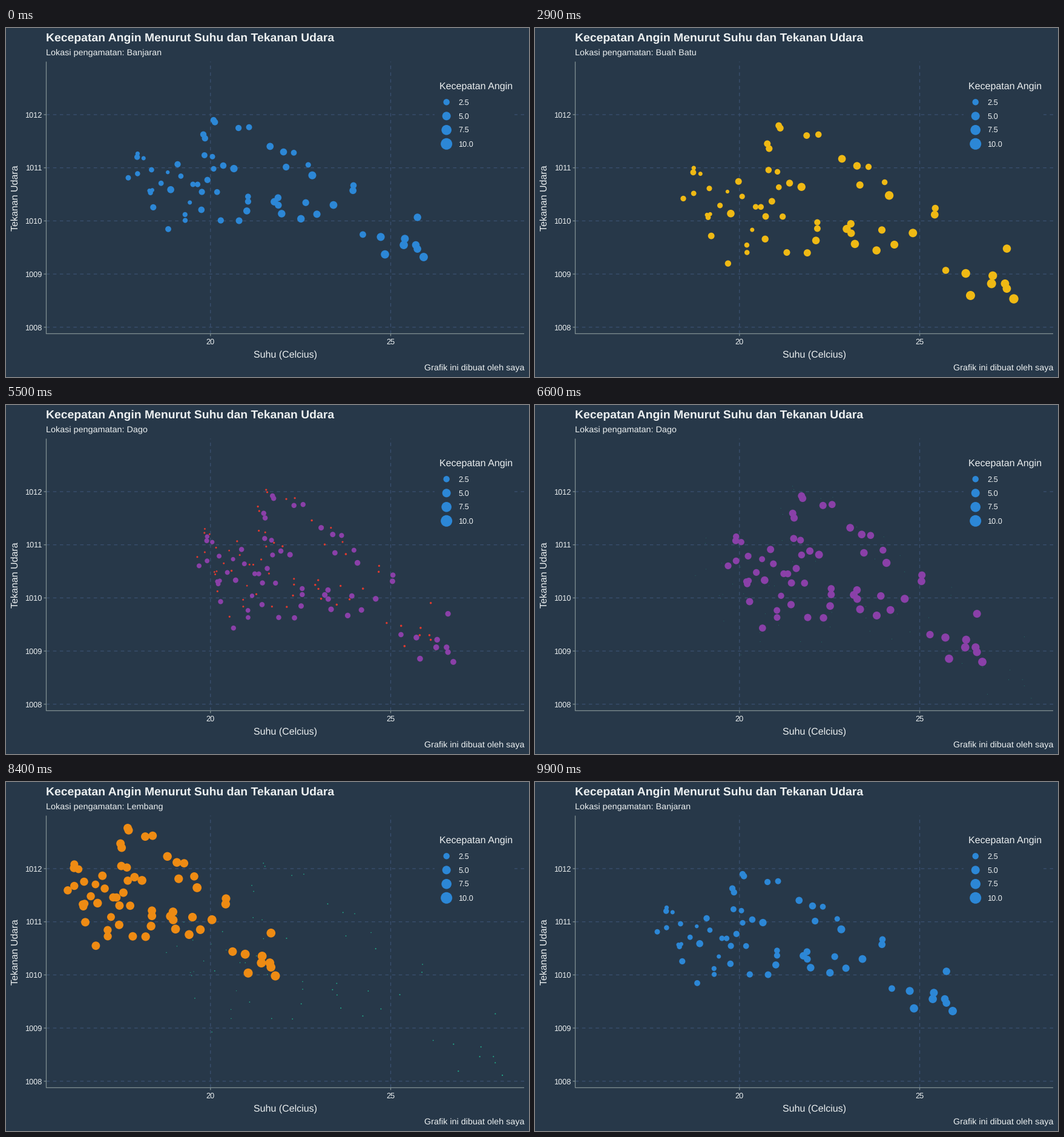
A matplotlib script that plays this animation: 864 px wide and 576 px high, repeating every 10000 ms.

```python
import numpy as np
import matplotlib.pyplot as plt
from matplotlib.animation import FuncAnimation
from matplotlib.patches import Rectangle

W, H, DPI = 864, 576, 100
PT = 72 / DPI
BG, INK, GRID, AXIS = "#273849", "#ecf0f1", "#3a5070", "#7f8f92"
BLUE = "#2c87d6"
FRAMES, MOVE = 100, 7

plt.rcParams["font.family"] = "Liberation Sans"
plt.rcParams["text.hinting"] = "none"
plt.rcParams["lines.scale_dashes"] = False

# One day of weather: (temperature, falling pressure), night to evening.
DAY = np.array([
    (.14, .36), (.22, .43), (.22, .53), (.25, .70), (.37, .58), (.48, .46),
    (.38, .33), (.36, .10), (.50, .13), (.65, .33), (.80, .50), (.98, .83),
    (.92, .97), (.72, .68), (.54, .60), (.42, .58), (.27, .34)])
HOURS = 66

# Name, colour, left, right, top, bottom, smallest and largest usual radius.
STATIONS = [
    ("Banjaran", BLUE, 202, 690, 152, 378, 3.5, 6.4),
    ("Braga", "#2fc75e", 260, 766, 153, 439, 3.8, 7.0),
    ("Buah Batu", "#efb914", 245, 791, 161, 447, 3.5, 7.0),
    ("Cibiru", "#e23a2e", 316, 710, 140, 403, 3.8, 4.9),
    ("Dago", "#8a40a8", 319, 739, 150, 424, 5.2, 6.7),
    ("Lanud", "#21b08c", 265, 820, 134, 484, 3.2, 7.8),
    ("Lembang", "#ee8b13", 102, 445, 76, 320, 7.1, 8.1),
]


def weather():
    """Three noisy days scaled to the unit square, with wind strength."""
    rng = np.random.default_rng(12)
    n = len(DAY)
    hour = np.linspace(0, 3 * n, HOURS, endpoint=False)
    path = np.column_stack([np.interp(hour, np.arange(n), c, period=n)
                            for c in DAY.T])
    path += rng.normal(0, (.045, .06), path.shape)
    path -= path.min(axis=0)
    path /= path.max(axis=0)
    wind = np.sqrt(path[:, 0]) + rng.normal(0, .2, HOURS)
    return path, wind


path, wind = weather()

fig = plt.figure(figsize=(W / DPI, H / DPI), dpi=DPI, facecolor=BG)
ax = fig.add_axes([0, 0, 1, 1])
ax.set(xlim=(0, W), ylim=(H, 0))
ax.axis("off")


def line(x0, y0, x1, y1, color=AXIS, **kw):
    ax.plot([x0, x1], [y0, y1], color=color, lw=1.3 * PT, snap=False,
            solid_capstyle="butt", dash_capstyle="butt", **kw)


def text(x, y, s, px, **kw):
    return ax.text(x, y, s, fontsize=px * PT, color=INK, va="baseline",
                   zorder=4, **kw)


def areas(radius):
    return (2 * PT * np.asarray(radius)) ** 2


dash = dict(color=GRID, zorder=1, ls=(0, (5.6 * PT, 5.6 * PT)))
for i in range(5):
    y = 493.8 - 87.7 * i
    line(66.5, y, 856, y, **dash)
    line(62.5, y, 66.5, y)
    text(59.5, y + 4.6, str(1008 + i), 12.8, ha="right")
for i in range(2):
    x = 337.8 + 297.7 * i
    line(x, 504.5, x, 55.5, **dash)
    line(x, 504.5, x, 508.5)
    text(x, 522, str(20 + 5 * i), 12.8, ha="center")
line(66.5, 55.5, 66.5, 505)
line(66, 504.5, 856, 504.5)

ax.add_patch(Rectangle((708, 80), 132, 129, fc=BG, lw=0, zorder=2.5))
text(716, 101, "Kecepatan Angin", 16)
legend_y = 122.3 + 23 * np.arange(4)
ax.scatter([727.7] * 4, legend_y, s=areas([5.2, 7, 8.3, 9.5]), c=BLUE,
           linewidths=0, zorder=3)
for i, y in enumerate(legend_y):
    text(747, y + 4.6, f"{2.5 * (i + 1):.1f}", 12.8)

text(66, 22, "Kecepatan Angin Menurut Suhu dan Tekanan Udara", 19.35,
     weight="bold")
subtitle = text(66, 45, "", 14.4)
text(461.5, 544, "Suhu (Celcius)", 16, ha="center")
text(19.5, 280.5, "Tekanan Udara", 16, ha="center", rotation=90,
     rotation_mode="anchor")
text(856, 565, "Grafik ini dibuat oleh saya", 14.4, ha="right")

leaving, entering = (ax.scatter([], [], linewidths=0, zorder=z)
                     for z in (3, 3.2))

# Last still frame of each station.
STARTS = [min(7 + 15 * k, 9 + 14 * k) for k in range(len(STATIONS))]


def cubic(p):
    return 4 * p ** 3 if p < 0.5 else 1 - 4 * (1 - p) ** 3


def show(dots, k, scale):
    _, color, x0, x1, y0, y1, r0, r1 = STATIONS[k]
    radius = np.maximum(r0 + (r1 - r0) * wind, 2.4)
    dots.set_offsets((x0, y0) + path * (x1 - x0, y1 - y0))
    dots.set_sizes(areas(0.3 + (radius - 0.3) * scale))
    dots.set_facecolor(color)
    dots.set_visible(scale > 0)


def update(frame):
    moves = sum(frame > s for s in STARTS)
    old, new, p = moves - 1, moves % len(STATIONS), 1
    if moves:
        start = STARTS[old]
        p = min(1, (frame - start) / min(MOVE, FRAMES - 1 - start))
    show(leaving, old, 1 - cubic(p))
    show(entering, new, cubic(p))
    name = STATIONS[new if p >= 0.5 else old][0]
    subtitle.set_text("Lokasi pengamatan: " + name)
    return leaving, entering, subtitle


anim = FuncAnimation(fig, update, frames=FRAMES, interval=100, repeat=True,
                     repeat_delay=0, blit=False)
plt.show()
```
